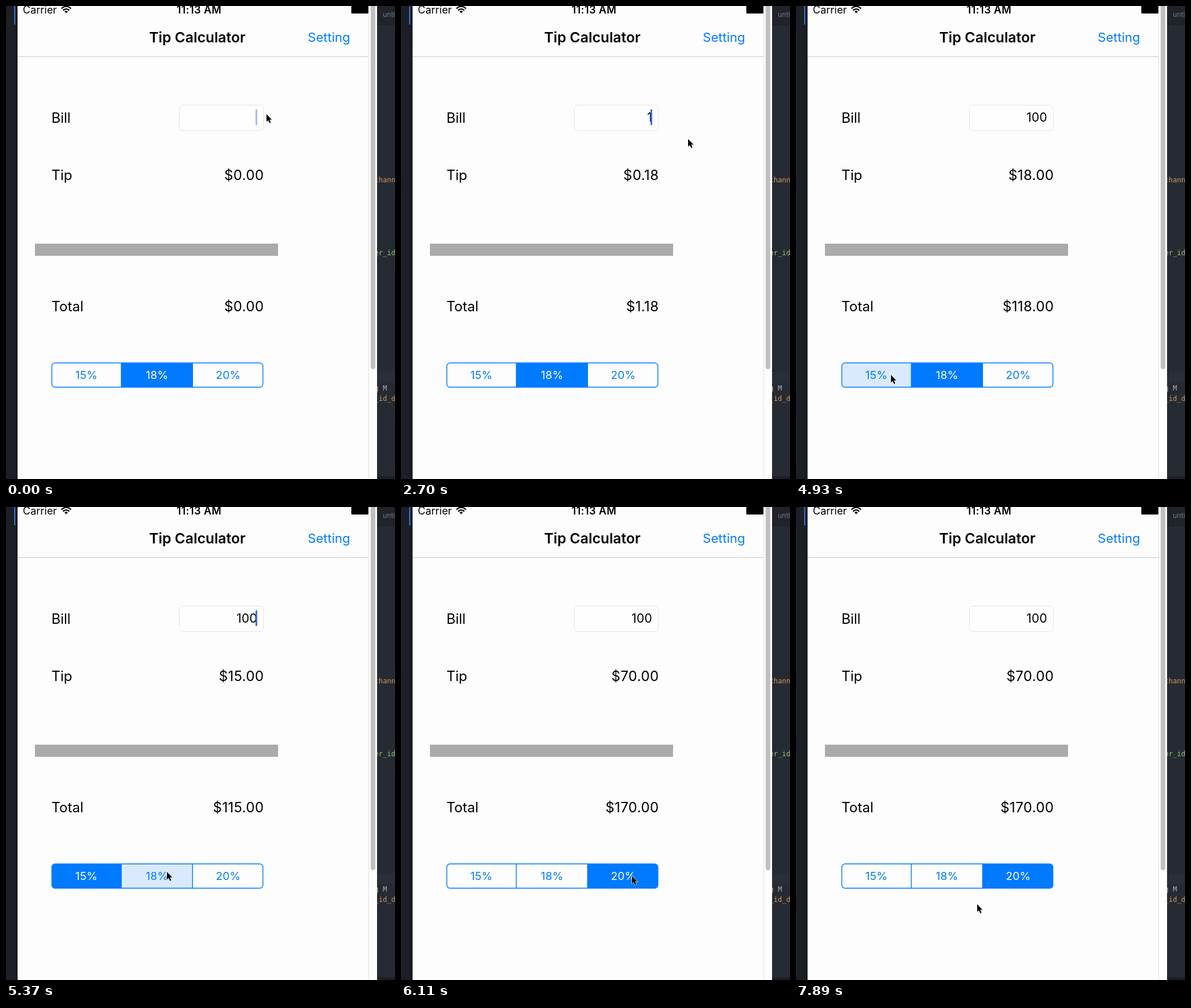
These frames come from a looping animation (672x818 px, 8000 ms). An HTML page:

```html
<!DOCTYPE html>
<html lang="en">
<head>
<meta charset="utf-8">
<title>Tip Calculator</title>
<style>
  html, body { margin: 0; width: 100%; height: 100%; overflow: hidden; background: #fdfdfd; }
  svg { display: block; width: 672px; height: 818px; font-family: Inter, "Open Sans", sans-serif; }
  .label { font-size: 24px; }
  .amount { font-size: 24px; letter-spacing: .4px; }
  .end { text-anchor: end; }
  .mid { text-anchor: middle; }
  .code { font: 12px "DejaVu Sans Mono", monospace; }
  .cell text { font-size: 19px; letter-spacing: .3px; fill: #007aff; text-anchor: middle; }
  .cell rect { fill: #fdfdfd; }
  .pressed rect { fill: #d9eaff; }
  .selected rect { fill: #007aff; }
  .selected text { fill: #fff; }
</style>
</head>
<body>
<svg viewBox="0 0 672 818">
  <defs>
    <clipPath id="rounded"><rect x="79" y="617" width="365" height="42.5" rx="6"/></clipPath>
    <path id="arrow" d="M0 0V13L3 10.4 5.2 15.4 7.4 14.4 5.2 9.6H9.2Z"/>
  </defs>

  <!-- editor behind the window -->
  <rect width="20" height="818" fill="#1c1f25"/>
  <rect x="13" width="7" height="818" fill="#191c22"/>
  <rect x="14" width="2" height="32" fill="#3670d8"/>
  <rect x="641" width="31" height="818" fill="#262a32"/>
  <rect x="641" width="31" height="33" fill="#20232a"/>
  <rect x="641" y="32" width="31" height="1" fill="#191c21"/>
  <rect x="641" y="634" width="31" height="18" fill="#2a2e37"/>
  <rect x="641" y="813" width="31" height="5" fill="#1d2026"/>
  <text x="651" y="19" font-size="12" fill="#717782">unti</text>
  <g class="code">
    <text x="636.5" y="305" fill="#d19a66">chann</text>
    <text x="636.5" y="431" fill="#98c379">er_id</text>
    <text x="636.5" y="665" fill="#d19a66">g <tspan fill="#abb2bf">M</tspan></text>
    <text x="636.5" y="683" fill="#d19a66">_id_d</text>
  </g>

  <!-- simulator window -->
  <rect x="20" width="621" height="818" fill="#fdfdfd"/>
  <rect x="626" width="1" height="818" fill="#e2e2e2"/>
  <rect x="630" y="-10" width="8" height="638" rx="4" fill="#c0c0c0"/>
  <rect x="20" y="87" width="606" height="1" fill="#cacaca"/>
  <text x="29" y="13" font-size="18">Carrier</text>
  <g fill="none" stroke="#000" stroke-width="2.3">
    <path d="M95.7 4.5Q104-3.2 112.3 4.5M98.6 7.6Q104 2.6 109.4 7.6"/>
    <path d="M101 9.6Q104 6.9 107 9.6L104 12.6Z" fill="#000" stroke="none"/>
  </g>
  <text class="mid" x="333.5" y="13" font-size="18" font-weight="600" letter-spacing=".4">11:13 AM</text>
  <rect x="596.5" y="-4" width="29.5" height="17" rx="1.5"/>
  <text class="mid" x="330.5" y="63" font-size="24.7" font-weight="600">Tip Calculator</text>
  <text class="end" x="594.5" y="62" font-size="22" fill="#007aff">Setting</text>

  <g class="label">
    <text x="78.5" y="202">Bill</text>
    <text x="78.5" y="301">Tip</text>
    <text x="78.5" y="528">Total</text>
  </g>
  <text class="amount end" id="tip" x="445.5" y="301"></text>
  <text class="amount end" id="total" x="445.5" y="528"></text>
  <rect x="299.5" y="171.5" width="145" height="44" rx="6" fill="#fefefe" stroke="#e3e3e3"/>
  <text class="end" id="bill" x="434" y="200" font-size="21" letter-spacing=".2"></text>
  <rect id="caret" x="431" y="178.5" width="3" height="27.5" rx="1" fill="#426be0"/>
  <rect x="50" y="411" width="420" height="21" fill="#aaa"/>

  <g clip-path="url(#rounded)">
    <g class="cell"><rect x="79" y="617" width="120" height="43"/><text x="139" y="645">15%</text></g>
    <g class="cell"><rect x="199" y="617" width="123" height="43"/><text x="261" y="645">18%</text></g>
    <g class="cell"><rect x="322" y="617" width="122" height="43"/><text x="384" y="645">20%</text></g>
  </g>
  <g fill="none" stroke="#007aff" stroke-width="1.4">
    <rect x="79.2" y="617.3" width="364.6" height="42" rx="5.5"/>
    <path d="M199.2 617V659M322.3 617V659"/>
  </g>

  <g id="cursor">
    <use href="#arrow" x=".8" y="1.4" opacity=".2"/>
    <use href="#arrow" stroke="#fff" stroke-width="1.2" paint-order="stroke"/>
  </g>
</svg>
<script>
const LOOP = 8000;
const FRAME = LOOP / 54;
const BLINK = 1030;
const PRESS = 150;
const TIP_RATES = [.15, .18, .7];

const $ = id => document.getElementById(id);
const cells = document.querySelectorAll('.cell');

const edits = [
  { at: -440, bill: '' }, { at: 1350, bill: '1' }, { at: 1800, bill: '10' },
  { at: 2700, bill: '1' }, { at: 3000, bill: '10' }, { at: 3150, bill: '100' }
];
const taps = [
  { at: -PRESS, cell: 1 }, { at: 4930, cell: 0 }, { at: 5370, cell: 1 }, { at: 5960, cell: 2 }
];
// The pointer rests between moves.
const moves = [
  { from: 0, to: 880, x: 436, y: 195 },
  { from: 1030, to: 1180, x: 496, y: 230 },
  { from: 3650, to: 4740, x: 164, y: 638 },
  { from: 5030, to: 5320, x: 278, y: 631 },
  { from: 5480, to: 5900, x: 399, y: 638 },
  { from: 6110, to: 6700, x: 648, y: 265 },
  { from: 6700, to: 7100, x: 567, y: 151 },
  { from: 7150, to: 7850, x: 313, y: 687 }
];

const clamp = v => Math.min(1, Math.max(0, v));
const ease = k => (1 - Math.cos(Math.PI * clamp(k))) / 2;
const latest = (list, t) => list.findLast(item => item.at <= t);

function pointerAt(t) {
  let x = 450, y = 187;
  for (const move of moves) {
    const k = ease((t - move.from) / (move.to - move.from));
    x += (move.x - x) * k;
    y += (move.y - y) * k;
  }
  return [Math.round(x), Math.round(y)];
}

// Each edit restarts the blink with the caret fully visible.
const caretAlpha = age => clamp(.5 + 2 * Math.cos(2 * Math.PI * (age - 180) / BLINK));

function draw(t) {
  const edit = latest(edits, t);
  const selected = latest(taps, t - PRESS).cell;
  const tap = latest(taps, t);
  const tip = edit.bill * TIP_RATES[selected];

  $('bill').textContent = edit.bill;
  $('tip').textContent = '$' + tip.toFixed(2);
  $('total').textContent = '$' + (+edit.bill + tip).toFixed(2);
  $('caret').setAttribute('opacity', caretAlpha(t - edit.at));
  cells.forEach((cell, i) => {
    cell.classList.toggle('selected', i === selected);
    cell.classList.toggle('pressed', i === tap.cell && t - tap.at < PRESS);
  });
  const frameStart = Math.floor(t / FRAME) * FRAME;
  $('cursor').setAttribute('transform', `translate(${pointerAt(frameStart)})`);
}

function tick() {
  draw(performance.now() % LOOP);
  requestAnimationFrame(tick);
}
tick();
</script>
</body>
</html>
```
